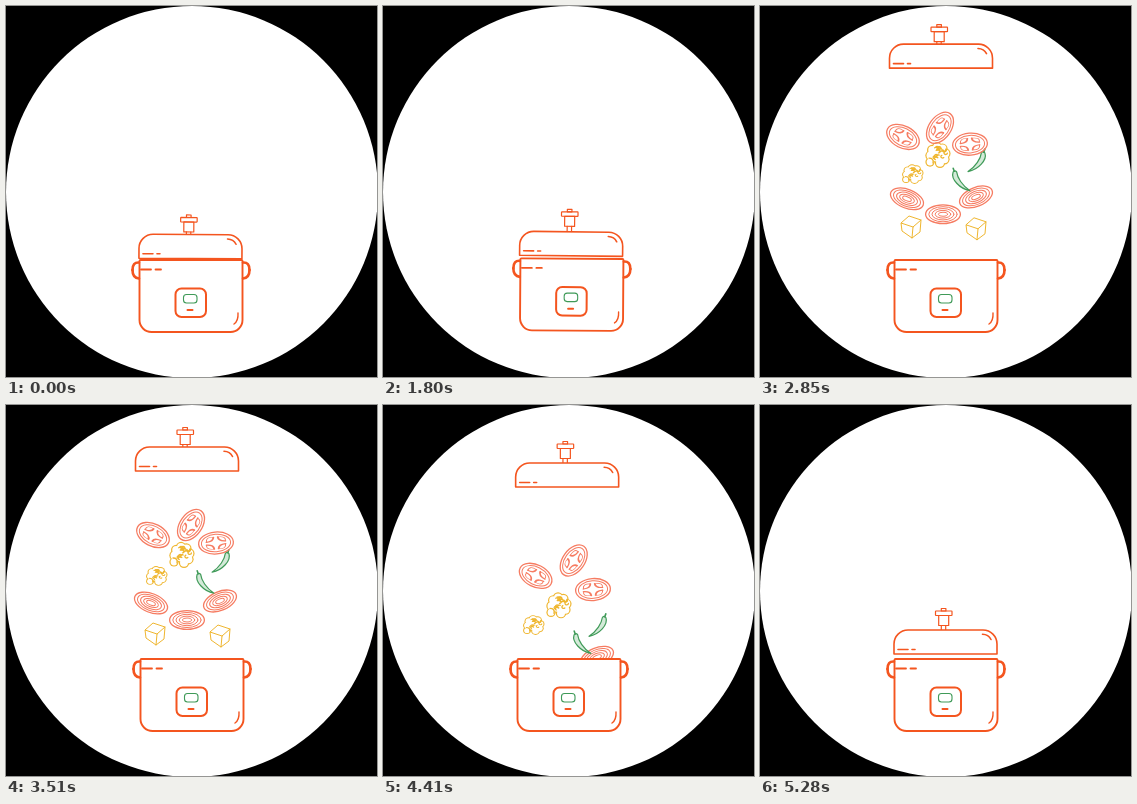
These frames come from a looping animation (371x371 px, 5340 ms). An HTML page with a canvas:

```html
<!DOCTYPE html>
<html lang="en">
<head>
<meta charset="utf-8">
<title>Cooker</title>
<style>
html, body { margin: 0; width: 100%; height: 100%; overflow: hidden; background: #000; }
canvas { display: block; width: 371px; height: 371px; }
</style>
</head>
<body>
<canvas id="stage"></canvas>
<script>
const SIZE = 371, LOOP = 5340, STEP = 30, RIM = 253, MID = 185, TAU = Math.PI * 2;
const ORANGE = '#f4551f', RED = '#f67c62', YELLOW = '#efb62f', STEAM = '#ebc862', GREEN = '#3f9a58';
const canvas = document.getElementById('stage');
const dpr = window.devicePixelRatio || 1;
canvas.width = canvas.height = Math.round(SIZE * dpr);
const c = canvas.getContext('2d');
c.lineCap = c.lineJoin = 'round';

const clamp = (v, a, b) => Math.min(b, Math.max(a, v));
const mix = (a, b, p) => a + (b - a) * p;
const ramp = (t, a, b) => clamp((t - a) / (b - a), 0, 1);
const smooth = (t, a, b) => {
  const p = ramp(t, a, b);
  return p * p * (3 - 2 * p);
};

function pen(color, width) {
  c.strokeStyle = color;
  c.lineWidth = width;
}
function line(...pts) {
  c.beginPath();
  for (let i = 0; i < pts.length; i += 2) c.lineTo(pts[i], pts[i + 1]);
  c.stroke();
}
function bend(x0, y0, cx, cy, x1, y1) {
  c.beginPath();
  c.moveTo(x0, y0);
  c.quadraticCurveTo(cx, cy, x1, y1);
  c.stroke();
}
function box(x, y, w, h, r) {
  c.beginPath();
  c.roundRect(x, y, w, h, r);
  c.stroke();
}
function oval(x, y, rx, ry, from = 0, to = TAU) {
  c.beginPath();
  c.ellipse(x, y, rx, ry, 0, from, to);
  c.stroke();
}
function placed(x, y, angle, draw) {
  c.save();
  c.translate(x, y);
  c.rotate(angle);
  draw();
  c.restore();
}
// Outline of several merged circles
function blob(circles, color, width) {
  const fill = (style, grow) => {
    c.fillStyle = style;
    for (const [x, y, r] of circles) {
      c.beginPath();
      c.arc(x, y, r + grow, 0, TAU);
      c.fill();
    }
  };
  fill(color, width / 2);
  fill('#fff', -width / 2);
}
function seeded(seed) {
  return () => (seed = seed * 16807 % 2147483647) / 2147483647;
}

function tomato() {
  pen(RED, 1.3);
  oval(0, 0, 17.4, 11);
  pen(RED, 1);
  oval(0, 0, 14.6, 8.8);
  c.scale(1, 0.62);
  for (let i = 0; i < 4; i++) {
    c.rotate(TAU / 4);
    pen(RED, 1.9);
    bend(2.2, 9.5, 2.5, 2.5, 9.5, 2.2);
    pen(RED, 1);
    bend(2.2, 9.5, 10, 11, 9.5, 2.2);
  }
}

function onion() {
  for (let i = 0; i < 5; i++) {
    pen(RED, i ? 1 : 1.3);
    oval(0, 0, 17.4 - i * 3.2, 9.4 - i * 1.85);
  }
}

function floret() {
  const lobes = [[0, 0, 7], [-7, 7, 4]];
  for (let i = 0; i < 7; i++) {
    const a = i * 0.75 - 3.2;
    lobes.push([1 + 7.5 * Math.cos(a), 8 * Math.sin(a), 4.6]);
  }
  blob(lobes, YELLOW, 1.2);
  const rnd = seeded(7);
  pen(YELLOW, 1.3);
  for (let i = 0; i < 16; i++) {
    const a = rnd() * TAU, r = 7 * Math.sqrt(rnd());
    oval(2 + r * Math.cos(a), r * Math.sin(a) - 2, 1.7, 1.4, a, a + 3.5);
  }
  bend(-8, 3, -3, 3, -4, 8);
}
function smallFloret() {
  c.scale(0.85, 0.76);
  floret();
}

function cube() {
  pen(YELLOW, 1);
  line(-10, -4, -2, -11, 10, -7, 9, 5, 1, 11, -9, 4, -10, -4, 2, 0, 10, -7);
  line(2, 0, 1, 11);
}

function chilli() {
  pen(GREEN, 1.2);
  c.fillStyle = '#d3ead8';
  c.beginPath();
  c.moveTo(-1, -11);
  c.bezierCurveTo(5, -7, 4, 6, -3, 14);
  c.bezierCurveTo(0, 5, -1, -4, -4, -9);
  c.quadraticCurveTo(-4, -12, -1, -11);
  c.fill();
  c.stroke();
  pen(GREEN, 1.6);
  line(-2.5, -11, -3.5, -14);
}
function leftChilli() {
  c.scale(-1, 1);
  chilli();
}

// Hover pose of each piece, in the order they drop: draw, x, y, angle
const foods = [
  [onion, 145, 198, 0.38], [cube, 149, 229, 0], [cube, 214, 231, 0],
  [onion, 181, 215, 0], [onion, 214, 196, -0.4], [leftChilli, 197, 179, -0.66],
  [chilli, 217, 158, 0.66], [smallFloret, 150, 171, 0], [floret, 175, 150, 0],
  [tomato, 210, 138, -0.08], [tomato, 147, 130, 0.47], [tomato, 185, 120, -0.95]
];
const HIDDEN = 275;

// The last to drop are the first to fly out
function drawFood([draw, x, y, angle], i) {
  const t = this.time, rank = foods.length - 1 - i;
  const start = Math.min(2500, 2200 + 12 * rank * rank), drop = 3725 + 34 * i;
  const up = Math.sin(ramp(t, start, 2850) * TAU / 4);
  const settle = smooth(t, 2850, 3500);
  const fall = ramp(t, drop, drop + 650) ** 2;
  if (!up || fall === 1) return;
  const sway = clamp((y - 138) / 2, -5, 2);
  const px = x + sway * (1 - settle) - 5 * Math.min(sway, 0) * fall;
  const top = y - 0.09 * (y - 140) * (1 - settle);
  const spin = 0.025 * Math.abs(x - MID) * (1 - up);
  placed(px, mix(mix(HIDDEN, top, up), HIDDEN, fall), angle + spin, draw);
}

function drawFoods(time) {
  c.save();
  c.beginPath();
  c.rect(0, 0, SIZE, RIM);
  c.clip();
  foods.forEach(drawFood, { time });
  c.restore();
}

function drawSteam(t) {
  if (t < 840 || t > 1500) return;
  const size = Math.min(1.38, (t - 825) / 375);
  c.save();
  c.globalAlpha = 1 - ramp(t, 1340, 1500);
  c.translate(170, 218);
  c.scale(size, size);
  c.translate(-170, -218);
  blob([[141.5, 179, 7.5], [157.5, 187, 14], [147, 188, 11], [139.5, 198, 8], [155, 206, 9.2], [148, 203, 7]], STEAM, 1.3);
  blob([[146.5, 167.5, 5.3]], STEAM, 1.2);
  blob([[163, 217, 3], [169, 218, 1.6]], STEAM, 1);
  pen(STEAM, 3);
  oval(157, 187, 10.5, 11, -2.2, -0.45);
  pen(STEAM, 1);
  oval(157, 187, 7.5, 8, -1.8, -0.2);
  oval(140, 198, 5, 5, 1.5, 3);
  oval(155, 206, 6, 6, 0, 1.2);
  c.restore();
}

function drawPot() {
  pen(ORANGE, 1.9);
  box(133.5, 254, 103, 72, [1, 1, 12, 12]);
  pen(ORANGE, 2.6);
  for (const side of [-1, 1]) {
    const x = MID + side * 52, out = MID + side * 58.5;
    bend(x, 256.5, out, 256, out, 264);
    bend(out, 264, out, 272, x, 272.5);
  }
  pen(ORANGE, 1.8);
  line(135, 263.5, 145, 263.5);
  line(149.5, 263.5, 155, 263.5);
  pen(ORANGE, 1.4);
  bend(232, 307, 232.5, 315, 228, 318);
  pen(ORANGE, 2);
  box(169.5, 282.5, 30.5, 28.5, 6);
  line(181.5, 304, 186.5, 304);
  pen(GREEN, 1.1);
  box(177.5, 288.5, 13.5, 8.5, 3);
}

function drawLid(pop) {
  pen(ORANGE, 1.6);
  box(133, 228.5, 103, 24, [14, 14, 0, 0]);
  line(137, 248, 147, 248);
  line(151, 248, 154, 248);
  bend(221.5, 232.8, 227.5, 233, 230, 238);
  pen(ORANGE, 1.2);
  for (const x of [180.3, 184.7]) line(x, 226 - pop, x, 228);
  box(177.7, 216 - pop, 10, 10, 0);
  box(174.5, 211.5 - pop, 16.5, 4.5, 0.5);
  box(180.3, 209 - pop, 4.6, 2.5, 0);
}

// Flies up past its place, sinks back, drops, then rests slightly raised
function lidHeight(t) {
  const rise = 201 * ramp(t, 2080, 2600) ** 1.35;
  const sink = 14.5 * (1 - (1 - ramp(t, 2600, 3300)) ** 3);
  const fall = ramp(t, 4320, 4840) ** 1.4;
  return (rise - sink) * (1 - fall) + 3.5 * smooth(t, 4840, 4950);
}

function draw(t) {
  c.setTransform(dpr, 0, 0, dpr, 0, 0);
  c.fillStyle = '#000';
  c.fillRect(0, 0, SIZE, SIZE);
  c.fillStyle = '#fff';
  c.beginPath();
  c.arc(186, 186, 186, 0, TAU);
  c.fill();

  const shake = 4 * Math.sin(ramp(t, 1230, 2150) * TAU / 2) ** 2;
  const shift = smooth(t, 1650, 2100);
  const x = MID + shift + shake * Math.sin(t / 28);
  const y = shake * 0.5 * Math.sin(t / 21);
  const sway = shake * 0.004 * Math.sin(t / 34);
  const pop = 4 * (smooth(t, 600, 900) - smooth(t, 1700, 2000)) + 2 * smooth(t, 4300, 4400);
  const lean = 4.5 * (smooth(t, 2080, 2400) - smooth(t, 3900, 4700));
  const tilt = 0.006 * (1 - smooth(t, 1650, 2080)) + 0.004 * Math.sin(t / 40) * (1 - ramp(t, 0, 540));

  drawFoods(t);
  drawSteam(t);
  placed(x, 290 + y, sway, () => {
    c.translate(-MID, -290);
    drawPot();
  });
  placed(x - lean, 241 + y - Math.abs(y) - lidHeight(t), sway + tilt, () => {
    c.translate(-MID, -241);
    drawLid(pop);
  });
}

const begin = performance.now();
function tick(now) {
  const t = Math.max(0, now - begin) % LOOP;
  draw(Math.min(LOOP - 2 * STEP, Math.floor(t / STEP) * STEP));
  requestAnimationFrame(tick);
}
draw(0);
requestAnimationFrame(tick);
</script>
</body>
</html>
```
